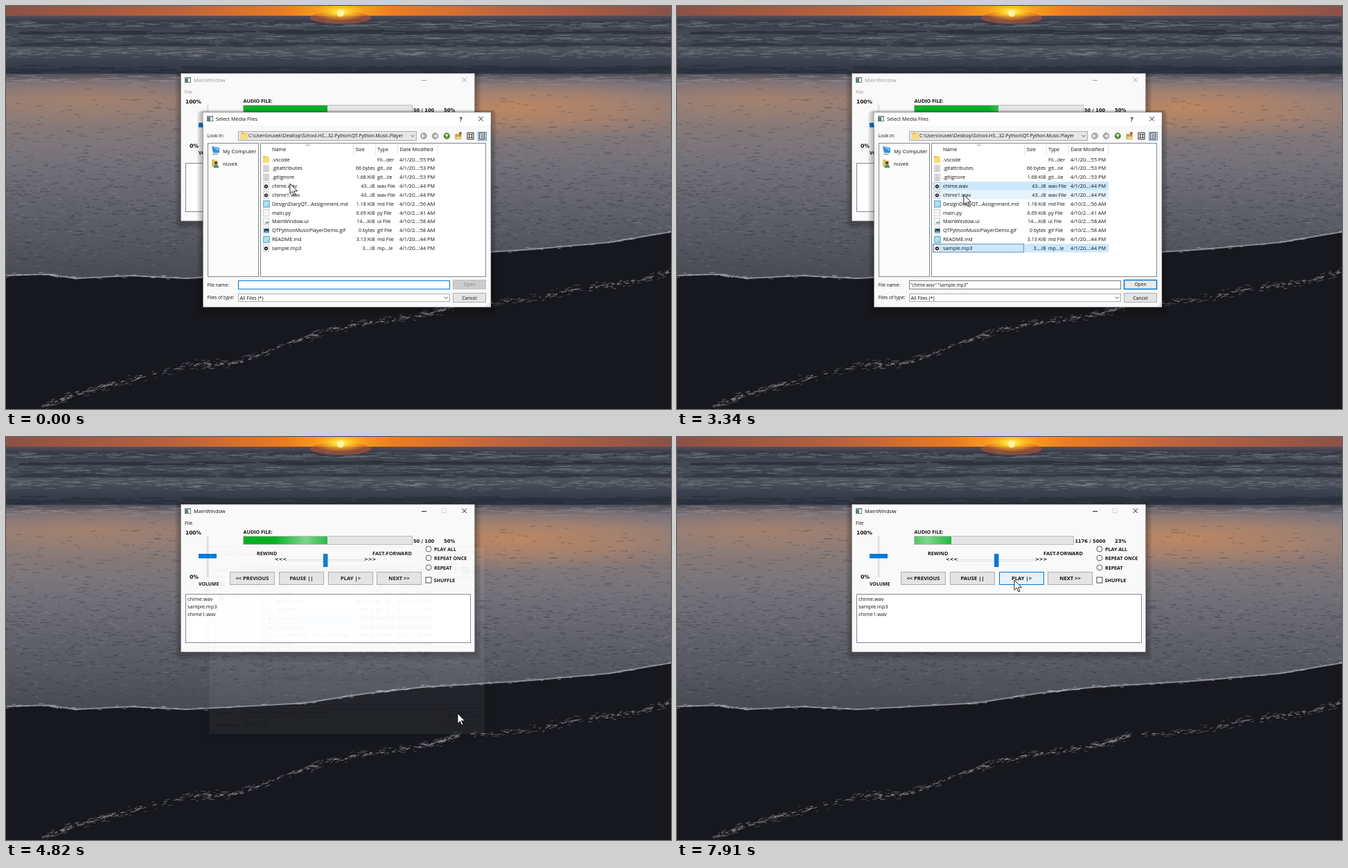
Recreate the animation shown at these times as an HTML page. Size 960 by 583 pixels, loop 8000 ms.

```html
<!DOCTYPE html>
<html lang="en">
<head>
<meta charset="utf-8">
<title>Music player</title>
<style>
html, body { margin: 0; width: 100%; height: 100%; overflow: hidden; background: #17181d; }
svg { position: absolute; left: 0; top: 0; width: 960px; height: 583px; }
text { font-family: "Open Sans", "Noto Sans", sans-serif; white-space: pre; }
.b { font-weight: 700; }
.d { font-family: "DejaVu Sans", "Noto Sans", sans-serif; font-weight: 700; }
</style>
</head>
<body>
<svg id="beach" viewBox="0 0 960 583"></svg>
<svg id="ui" viewBox="0 0 960 583">
  <defs>
    <linearGradient id="glow">
      <stop offset="0" stop-color="#fff" stop-opacity="0"/>
      <stop offset=".5" stop-color="#fff" stop-opacity=".48"/>
      <stop offset="1" stop-color="#fff" stop-opacity="0"/>
    </linearGradient>
  </defs>
</svg>
<script>
const LOOP = 8000;
const $ = id => document.getElementById(id);

function set(node, attrs) {
  for (const k in attrs) node.setAttribute(k, attrs[k]);
  return node;
}
function add(parent, tag, attrs, content) {
  const node = set(document.createElementNS('http://www.w3.org/2000/svg', tag), attrs);
  if (content !== undefined) node.textContent = content;
  parent.appendChild(node);
  return node;
}
const group = parent => add(parent, 'g', {});
const rect = (p, x, y, w, h, fill, more) => add(p, 'rect', { x, y, width: w, height: h, fill, ...more });
const box = (p, x, y, w, h, fill, stroke) => rect(p, x + .5, y + .5, w, h, fill, { stroke });
const line = (p, d, stroke, width = 1) => add(p, 'path', { d, stroke, 'stroke-width': width, fill: 'none' });
const shape = (p, d, fill) => add(p, 'path', { d, fill });
const disc = (p, cx, cy, r, fill, more) => add(p, 'circle', { cx, cy, r, fill, ...more });
// cy is the middle of the capitals
const label = (p, x, cy, size, str, more) =>
  add(p, 'text', { x, y: cy + size * .36, 'font-size': size, fill: '#111', ...more }, str);
const bold = (p, x, cy, size, str, more) => label(p, x, cy, size, str, { class: 'b', ...more });
const digits = (p, x, cy, size, str) => label(p, x, cy, size, str, { class: 'd' });
const show = (node, on) => set(node, { visibility: on ? 'inherit' : 'hidden' });

// ---------- beach ----------
let seed = 7;
const rnd = () => (seed = seed * 16807 % 2147483647) / 2147483647;

function gradient(parent, id, stops, vertical = true, radial = null) {
  const g = add(parent, radial ? 'radialGradient' : 'linearGradient',
    { id, ...(radial || { x1: 0, y1: 0, x2: vertical ? 0 : 1, y2: vertical ? 1 : 0 }) });
  stops.forEach(([offset, color, alpha = 1]) =>
    add(g, 'stop', { offset, 'stop-color': color, 'stop-opacity': alpha }));
  return `url(#${id})`;
}
// Short strokes scattered along a polyline
function flecks(parent, pts, n, spread, len, color, alpha, width = 1) {
  let d = '';
  for (let i = 0; i < n; i++) {
    const u = rnd() * (pts.length - 1), k = Math.floor(u), f = u - k;
    const [a, b] = [pts[k], pts[k + 1]];
    const slope = (b[1] - a[1]) / (b[0] - a[0]), w = len * (.3 + rnd());
    const x = a[0] + (b[0] - a[0]) * f;
    const y = a[1] + (b[1] - a[1]) * f + (rnd() + rnd() - 1) * spread;
    d += `M${x.toFixed(1)} ${y.toFixed(1)}l${w.toFixed(1)} ${(w * slope + rnd() - .5).toFixed(1)}`;
  }
  set(line(parent, d, color, width), { opacity: alpha });
}
const level = y => [[-10, y], [970, y]];

function drawBeach() {
  const p = $('beach');
  const sky = gradient(p, 'sky', [[0, '#8b5145'], [.25, '#b8623e'], [.42, '#ec7b22'], [.503, '#ffb41c'],
    [.58, '#ee7d22'], [.75, '#bd6440'], [1, '#8a5248']], false);
  const sea = gradient(p, 'sea', [[0, '#56505a'], [.1, '#343a47'], [.3, '#454a56'], [.42, '#3a404c'],
    [.55, '#4d525d'], [.75, '#3c424f'], [1, '#2d323e']]);
  const wet = gradient(p, 'wet', [[0, '#4b4c56'], [.05, '#77727a'], [.12, '#8d7c79'], [.22, '#8a7b78'],
    [.4, '#77737a'], [.65, '#60616a'], [1, '#484a52']]);
  const warm = gradient(p, 'warm', [[0, '#cf8a5a', .75], [.5, '#bd8763', .5], [1, '#a08070', 0]], true,
    { cx: .5, cy: .5, r: .5 });
  const sun = gradient(p, 'sun', [[0, '#fff7a0'], [.3, '#ffd52c'], [1, '#ff9a18', 0]], true,
    { cx: .5, cy: .5, r: .5 });

  rect(p, 0, 0, 960, 15, sky);
  rect(p, 0, 14, 960, 86, sea);
  rect(p, 0, 98, 960, 300, wet);
  add(p, 'ellipse', { cx: 730, cy: 148, rx: 330, ry: 50, fill: warm });
  add(p, 'ellipse', { cx: 120, cy: 135, rx: 260, ry: 42, fill: warm, opacity: .45 });
  add(p, 'ellipse', { cx: 483, cy: 17, rx: 44, ry: 9, fill: '#c9572e', opacity: .55 });
  add(p, 'ellipse', { cx: 483, cy: 8, rx: 40, ry: 14, fill: sun });
  disc(p, 483, 10.5, 5, '#fff3a6');

  flecks(p, level(27), 260, 6, 22, '#777a82', .5);
  flecks(p, level(47), 260, 7, 20, '#7d8088', .4);
  flecks(p, level(68), 420, 10, 16, '#858891', .4);
  flecks(p, level(38), 120, 3, 40, '#252a35', .7, 2);
  flecks(p, level(56), 120, 3, 40, '#2b303b', .7, 2);
  flecks(p, level(92), 160, 6, 40, '#262b37', .6, 2);
  flecks(p, level(107), 200, 9, 24, '#9c979a', .4);
  flecks(p, level(215), 900, 105, 9, '#383a43', .35);
  flecks(p, level(310), 1300, 95, 7, '#2d2f38', .45);
  flecks(p, level(290), 900, 100, 7, '#94929a', .3);

  const shore = [[-5, 390], [60, 388], [100, 394], [180, 390], [260, 394], [430, 385], [520, 371],
    [600, 362], [760, 352], [870, 342], [965, 326]];
  shape(p, 'M' + shore.join('L') + 'V590H-5Z', '#17181d');
  line(p, 'M' + shore.join('L'), '#85868d', 2);
  flecks(p, shore, 160, 3, 6, '#b5b6bc', .6);

  const foam = [[50, 580], [95, 564], [160, 545], [270, 519], [330, 517], [400, 491], [470, 468],
    [530, 457], [610, 446], [650, 433], [760, 424], [830, 408], [900, 401], [960, 384]];
  flecks(p, foam, 420, 8, 6, '#74767d', .55);
  flecks(p, foam, 220, 3, 5, '#b4b5ba', .6);
}

// ---------- windows ----------
const ui = $('ui');

function shadow(p, x, y, w, h) {
  for (let i = 4; i; i--) rect(p, x - i * 2, y - i, w + i * 4, h + i * 4, '#000', { rx: i * 2, opacity: .07 });
}
function appIcon(p, x, y) {
  box(p, x, y, 8, 7, '#fff', '#777');
  rect(p, x + 1, y + 2, 4, 5, '#3f8a86');
  rect(p, x + 1, y + 1, 7, 1, '#9fb6c8');
}
function button(p, x, y, w, h, str, size, cls) {
  const face = box(p, x, y, w, h, '#e4e4e4', '#adadad');
  const text = label(p, x + w / 2 + .5, y + h / 2 + .5, size, str, { 'text-anchor': 'middle', class: cls });
  return { face, text };
}
const FACE = {
  plain: { fill: '#e4e4e4', stroke: '#adadad' },
  main: { fill: '#e9e9e9', stroke: '#0078d7', 'stroke-width': 1.5 },
  hover: { fill: '#e5f1fb', stroke: '#0078d7' },
  down: { fill: '#cce4f7', stroke: '#005499' },
  off: { fill: '#cccccc', stroke: '#bfbfbf', 'stroke-width': 1 }
};

function buildPlayer() {
  const p = group(ui), o = {};
  shadow(p, 252, 98, 425, 213);
  rect(p, 252.5, 97.5, 424, 213.5, '#f9f9f9', { stroke: '#8a8a8a', 'stroke-width': .6 });
  appIcon(p, 258, 103);
  o.tint = [label(p, 271, 107, 7.5, 'MainWindow'), label(p, 258, 124, 7, 'File')];
  o.marks = line(p, 'M600 107.5H607M658.5 103.5l6.5 6.5M665 103.5l-6.5 6.5', '#111', .9);
  o.max = rect(p, 629, 103.5, 6, 6, 'none', { stroke: '#ccc', 'stroke-width': .8 });

  digits(p, 259, 138, 7.4, '100%');
  digits(p, 265, 202, 7.7, '0%');
  bold(p, 278, 212.5, 6.9, 'VOLUME');
  bold(p, 342.5, 137.5, 7.2, 'AUDIO FILE:');
  bold(p, 362, 168.5, 7.2, 'REWIND');
  bold(p, 529, 168.5, 7.45, 'FAST-FORWARD');
  digits(p, 388, 176.5, 6.8, '<<<');
  digits(p, 517, 176.5, 6.8, '>>>');

  rect(p, 289.5, 143, 3, 60, '#e2e2e2');
  rect(p, 278, 169, 26, 6.5, '#0078d7');
  rect(p, 405, 177.3, 112, 2.4, '#fff', { stroke: '#cfcfcf', 'stroke-width': .7 });
  rect(p, 458, 169, 6.5, 19, '#0078d7');

  o.bar = box(p, 342, 143, 244, 12, '#e4e4e4', '#bcbcbc');
  o.fill = rect(p, 343, 144, 121, 11, '#06b025');
  const clip = add(add(p, 'clipPath', { id: 'filled' }), 'rect', { x: 343, y: 144, width: 121, height: 11 });
  o.clip = clip;
  o.glow = rect(add(p, 'g', { 'clip-path': 'url(#filled)' }), 0, 144, 90, 11, 'url(#glow)');
  o.count = digits(p, 588, 150.5, 6.65, '');
  o.percent = digits(p, 632, 150.5, 6.9, '');

  [['PLAY ALL', 162], ['REPEAT ONCE', 175], ['REPEAT', 188.8]].forEach(([str, y]) => {
    disc(p, 610, y, 4, '#fff', { stroke: '#333', 'stroke-width': .8 });
    bold(p, 618, y + .2, 7.1, str);
  });
  rect(p, 606, 203, 8, 8, '#fff', { stroke: '#333', 'stroke-width': .9 });
  bold(p, 617.5, 207.5, 7.2, 'SHUFFLE');

  ['<< PREVIOUS', 'PAUSE ||', 'PLAY |>', 'NEXT >>'].forEach((str, i) => {
    const b = button(p, 323 + Math.round(i * 70.8), 195, 64, 18, str, 7.6, 'b');
    if (i === 2) o.play = b.face;
  });
  box(p, 259, 227, 411, 70, '#fff', '#828790');
  o.list = group(p);
  ['chime.wav', 'sample.mp3', 'chime1.wav'].forEach((s, i) => label(o.list, 262, 234 + i * 11, 7.4, s));
  return o;
}

const ROW_TOP = 215.6, ROW_H = 12.83;
const FILES = [
  ['.vscode', '', 'Fil...der', '4/1/20...:55 PM', 'dir'],
  ['.gitattributes', '66 bytes', 'git...ile', '4/1/20...:53 PM', 'text'],
  ['.gitignore', '1.68 KiB', 'git...ile', '4/1/20...:53 PM', 'text'],
  ['chime.wav', '43...iB', 'wav File', '4/1/20...:44 PM', 'audio'],
  ['chime1.wav', '43...iB', 'wav File', '4/1/20...:44 PM', 'audio'],
  ['DesignDiaryQT...Assignment.md', '1.18 KiB', 'md File', '4/10/2...:56 AM', 'note'],
  ['main.py', '6.69 KiB', 'py File', '4/10/2...:41 AM', 'page'],
  ['MainWindow.ui', '14....KiB', 'ui File', '4/10/2...:58 AM', 'form'],
  ['QTPythonMusicPlayerDemo.gif', '0 bytes', 'gif File', '4/10/2...:58 AM', 'image'],
  ['README.md', '3.13 KiB', 'md File', '4/1/20...:44 PM', 'note'],
  ['sample.mp3', '3....iB', 'mp...le', '4/1/20...:44 PM', 'audio']
];
const CHIME = 3, CHIME1 = 4, SAMPLE = 10;

function folder(p, x, y) {
  shape(p, `M${x} ${y}h4l1 1.2h4v8.8h-9z`, '#e9b93c');
  rect(p, x, y + 2, 9, 8, '#ffd978');
}
function fileIcon(p, kind, cy) {
  const x = 371, y = cy - 5;
  if (kind === 'dir') return folder(p, x, y);
  if (kind === 'note') {
    rect(p, x + .5, y + .5, 9, 9.5, '#8fd0e8', { stroke: '#5a9fbb', 'stroke-width': .7 });
    return line(p, `M${x + 2} ${y + 3.5}h6M${x + 2} ${y + 5.5}h6M${x + 2} ${y + 7.5}h4`, '#e8f8ff', .9);
  }
  rect(p, x + .8, y + .3, 7.6, 9.6, kind === 'text' ? '#ececec' : '#fff', { stroke: '#a5a5a5', 'stroke-width': .6 });
  if (kind === 'text') line(p, `M${x + 2} ${y + 2.5}h5M${x + 2} ${y + 4.5}h5M${x + 2} ${y + 6.5}h5M${x + 2} ${y + 8.3}h5`, '#a0a0a0', .7);
  if (kind === 'page') line(p, `M${x + 2} ${y + 3.5}h4M${x + 2} ${y + 6}h5`, '#d5d5d5', .7);
  if (kind === 'form') shape(p, `M${x + 2} ${y + 8}l2.5-3 1.5 1 2-2v4z`, '#6aaf8c');
  if (kind === 'image') {
    rect(p, x + 1.5, y + 2.5, 7, 5.5, '#17375c');
    shape(p, `M${x + 2} ${y + 7.5}l2-3 1.5 1.5 1.3-1 1.4 2.5z`, '#58a5e0');
  }
  if (kind === 'audio') {
    disc(p, x + 4.5, y + 5.5, 2.7, '#222');
    disc(p, x + 4.5, y + 5.5, 1, '#ddd');
  }
}

function toolbar(p) {
  [[603, '#a9a9a9', 'M605.5 188h-5m2-2l-2 2 2 2'], [619.5, '#a9a9a9', 'M617 188h5m-2-2l2 2-2 2'],
    [636.3, '#3f8f25', 'M636.3 190.5v-5m-2 2l2-2 2 2']].forEach(([x, color, d]) => {
    disc(p, x, 188, 4.4, color, { stroke: '#777', 'stroke-width': .5 });
    line(p, d, '#fff', 1.2);
  });
  shape(p, 'M648.5 185h4l1 1.5h4v6.500h-9z', '#c9a24a');
  shape(p, 'M654 182.500l4 0-1 4-3 1z', '#c0503a');
  rect(p, 650, 189, 7, 3.5, '#eed48b');
  rect(p, 666, 183.500, 9, 9, '#fff', { stroke: '#222' });
  [667.7, 671.2].forEach(x => [185.200, 188.700].forEach(y => rect(p, x, y, 2.200, 2.200, '#222')));
  box(p, 681, 182, 12, 12, '#cfe5f7', '#5d9bd1');
  rect(p, 683.5, 184, 7.5, 8.500, '#fff', { stroke: '#222', 'stroke-width': .9 });
  line(p, 'M685 186.500h5M685 188.500h5M685 190.500h5', '#222', .8);
}

function buildDialog() {
  const p = group(ui), o = { root: p };
  shadow(p, 284, 154, 416, 282);
  rect(p, 284.3, 153.8, 415.7, 282, '#f9f9f9', { stroke: '#666', 'stroke-width': .6 });
  rect(p, 284.6, 154.1, 415, 18, '#fff');
  appIcon(p, 290, 159);
  label(p, 303, 163.500, 7.3, 'Select Media Files');
  label(p, 654.500, 163.500, 8.5, '?', { class: 'b' });
  line(p, 'M682.300 160l6.500 6.500M688.800 160l-6.500 6.500', '#111', .9);

  label(p, 290.5, 188, 6.6, 'Look in:');
  box(p, 335, 181, 257, 13, '#e6e6e6', '#adadad');
  folder(p, 339.5, 183);
  label(p, 350, 188, 6.68, 'C:\\Users\\nuvek\\Desktop\\School-HS...32-Python\\QT-Python-Music-Player');
  line(p, 'M584.500 186.700l2.500 2.500 2.500-2.500', '#444', .9);
  toolbar(p);

  box(p, 291, 198, 73, 193, '#fcfcfc', '#828790');
  shape(p, 'M297 203l11 2v7.500l-9 0z', '#2f8fe0');
  shape(p, 'M298 204l9 1.800v4z', '#7cc4f7');
  line(p, 'M298 214.500h8', '#8b98a5', 1.4);
  label(p, 313, 210, 7.6, 'My Computer');
  shape(p, 'M297 222h4l1 1.500h4v9h-9z', '#e6c25c');
  disc(p, 303, 227, 2.2, '#3c4a55');
  shape(p, 'M299.500 234a3.600 4 0 0 1 7.500 0z', '#3f8f7a');
  label(p, 313, 228, 7.5, 'nuvek');

  box(p, 367, 198, 325, 193, '#fff', '#828790');
  line(p, 'M501.500 200v15M533.500 200v15M565.500 200v15M622.500 200v15', '#e3e3e3');
  line(p, 'M433 202.500l2.500-2.300 2.500 2.300', '#555', .8);
  [['Name', 384], ['Size', 504.5], ['Type', 536], ['Date Modified', 568.5]]
    .forEach(([s, x]) => label(p, x, 207.300, 7.3, s));

  o.rows = FILES.map(([name, size, type, date, kind], i) => {
    const y = ROW_TOP + i * ROW_H, cy = y + ROW_H / 2;
    const back = rect(p, 369, y, 254, ROW_H - .3, '#cce8ff');
    const ring = rect(p, 369.500, y + .4, 131, ROW_H - 1, 'none', { stroke: '#5f87a8', 'stroke-width': .9 });
    fileIcon(p, kind, cy);
    label(p, 384, cy, 7.35, name);
    label(p, 532.5, cy, 7.1, size, { 'text-anchor': 'end' });
    label(p, 536, cy, 7.1, type);
    label(p, 568, cy, 7.3, date);
    return { back, ring };
  });

  label(p, 290.5, 404, 6.6, 'File name:');
  o.field = box(p, 335, 397, 305, 12, '#fff', '#7a7a7a');
  o.name = label(p, 337, 403.700, 6.65, '');
  o.caret = rect(p, 337, 398.500, .9, 9.500, '#111');
  o.open = button(p, 645, 396, 47, 13, 'Open', 6.7);
  label(p, 290.5, 422, 6.7, 'Files of type:');
  box(p, 335, 416, 305, 11, '#fff', '#adadad');
  label(p, 337.5, 422.300, 7, 'All Files (*)');
  line(p, 'M632.500 420.700l2.700 2.700 2.700-2.700', '#333', .9);
  button(p, 645, 415, 47, 13, 'Cancel', 7);
  [[697, 433], [694.500, 433], [697, 430.500]].forEach(([x, y]) => rect(p, x, y, 1.3, 1.3, '#b5b5b5'));
  return o;
}

drawBeach();
const player = buildPlayer(), dialog = buildDialog();
const pointer = add(ui, 'path', {
  d: 'M0 0V14.500L3.400 11.300 5.800 17 8 16 5.600 10.700H10.500Z',
  fill: '#fff', stroke: '#111', 'stroke-width': .9
});

// ---------- timeline ----------
const TICKS = [0, 150, 270, 400, 540, 690, 810, 930, 1080, 1210, 1360, 1480, 1630, 1780, 2310, 2430, 2560,
  2680, 2820, 2950, 3090, 3210, 3340, 3480, 3630, 3750, 3870, 3990, 4110, 4260, 4390, 4540, 4690, 4820,
  4970, 5090, 5210, 5360, 5640, 5770, 5910, 6030, 6180, 6300, 7620, 7760, 7910];
const POINTER = [[0, 410, 257], [1080, 416, 310], [1210, 420, 338], [1360, 421, 340], [1630, 421, 344],
  [1780, 423, 353], [2680, 421, 345], [2820, 416, 300], [2950, 414, 273], [3630, 440, 283],
  [3750, 500, 325], [3870, 585, 375], [3990, 626, 393], [4110, 632, 393], [4260, 640, 396],
  [4390, 647, 396], [4540, 652, 398], [4690, 652, 400], [4970, 648, 385], [5090, 625, 330],
  [5210, 575, 259], [5360, 545, 256], [5640, 515, 235], [5770, 495, 206], [5910, 490, 206], [6030, 487, 207]];
const PICKS = [[690, CHIME], [2430, SAMPLE], [3480, CHIME1]];
const CLOSE = 4690, RESET = 6180, START = 7620;
const SWEEP = 1840, SPEED = .17;

function glowCentre(t) {
  return t < START ? 298 + SPEED * ((t - 350 + SWEEP) % SWEEP) : 298 + SPEED * (t - 7540);
}

function drawPlayer(t) {
  const active = t >= CLOSE, ink = active ? '#111' : '#999';
  player.tint.forEach(n => set(n, { fill: ink }));
  set(player.marks, { stroke: ink });
  show(player.max, active);
  show(player.list, active);

  const [len, fill, count, cx, pct, px] = t < RESET ? [244, 121, '50 / 100', 588, '50%', 632]
    : t < START ? [248, 0, '0 / 5000', 592, '0%', 636]
    : [230, 53, '1176 / 5000', 574.500, '23%', 632];
  set(player.bar, { width: len });
  set(player.fill, { width: fill });
  set(player.clip, { width: fill });
  set(player.glow, { x: glowCentre(t) - 45 });
  set(player.count, { x: cx }).textContent = count;
  set(player.percent, { x: px }).textContent = pct;
  set(player.play, t < 5770 ? FACE.plain : t >= 6030 && t < RESET ? FACE.down : FACE.hover);
}

function drawDialog(t, x, y) {
  show(dialog.root, t < 4970);
  if (t >= 4970) return;
  const fade = t < CLOSE ? [1, 1] : t < 4820 ? [.978, .5] : [.957, .05];
  set(dialog.root, {
    transform: `translate(492 295) scale(${fade[0]}) translate(-492 -295)`, opacity: fade[1]
  });

  const picked = PICKS.filter(k => t >= k[0]).map(k => k[1]);
  const last = picked[picked.length - 1];
  const over = t >= 690 && x < 623 ? Math.floor((y - ROW_TOP) / ROW_H) : -1;
  dialog.rows.forEach(({ back, ring }, i) => {
    const on = picked.includes(i);
    show(back, on || i === over);
    set(back, { fill: on ? '#cce8ff' : '#e5f3ff' });
    show(ring, i === last);
  });

  const names = picked.map(i => FILES[i][0]);
  dialog.name.textContent = names.length > 1 ? names.map(n => `"${n}"`).join(' ') : names.join('');
  set(dialog.field, { stroke: picked.length ? '#7a7a7a' : '#0078d7' });
  show(dialog.caret, t >= 150 && t < 540);
  set(dialog.open.face, !picked.length ? FACE.off : t >= 4540 ? FACE.hover : FACE.main);
  set(dialog.open.text, { fill: picked.length ? '#111' : '#838383' });
}

let shown = -1;
function render(time) {
  const t = TICKS.findLast(k => k <= time);
  if (t === shown) return;
  shown = t;
  const [, x, y] = POINTER.findLast(k => k[0] <= t);
  drawPlayer(t);
  drawDialog(t, x, y);
  set(pointer, { transform: `translate(${x} ${y})` });
}

const begin = performance.now();
function frame() {
  render((performance.now() - begin) % LOOP);
  requestAnimationFrame(frame);
}
frame();
</script>
</body>
</html>
```
